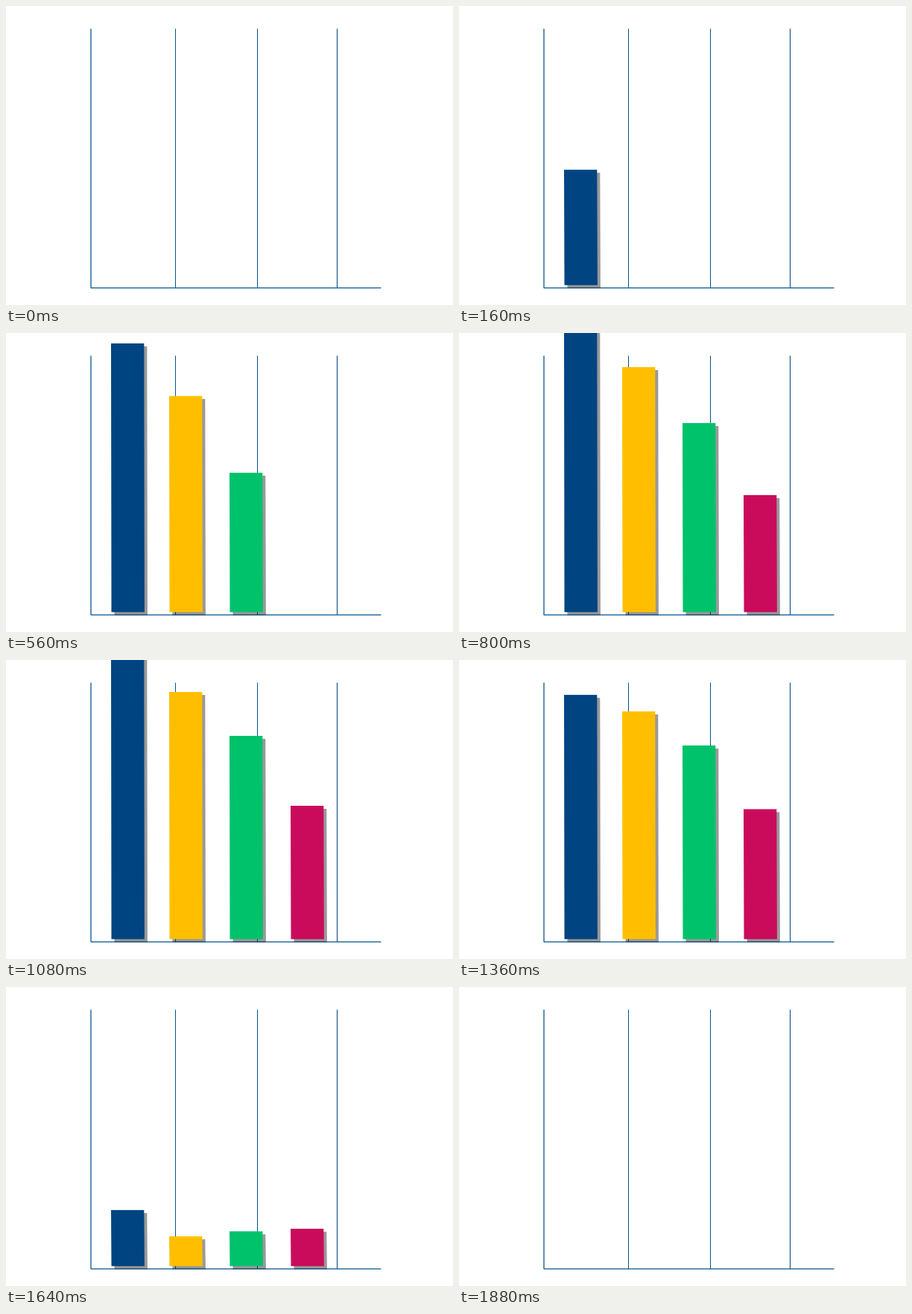
A matplotlib script that plays this animation: 600 by 402 pixels, repeating every 1.92 s.

```python
import numpy as np
import matplotlib.pyplot as plt
from matplotlib.animation import FuncAnimation
from matplotlib.patches import Polygon

W, H, DPI = 600, 402, 64
FRAMES, STEP = 48, 40
BASE, TOP, FLOOR = 375, 30.5, 379
NAVY, BLUE = "#004481", "#00528f"
SHRINK_END = 1860

S = np.linspace(0, 1, 1001)


def ease(t, start, end, x1, x2):
    """Cubic Bezier easing with handles (x1, 0) and (x2, 1)."""
    a, b, c = 3 * (1 - S) ** 2 * S, 3 * (1 - S) * S ** 2, S ** 3
    u = np.clip((t - start) / (end - start), 0, 1)
    return np.interp(u, a * x1 + b * x2 + c, b + c)


class Bar:
    def __init__(self, x, color, full, rise, fall, landing):
        self.x, self.full = x, full
        self.rise, self.fall, self.landing = rise, fall, landing
        self.shadow = self.patch("black", 2, alpha=0.4)
        self.front = self.patch(color, 3)

    def patch(self, color, z, **kw):
        return ax.add_patch(Polygon(self.corners(0), fc=color, ec="none", lw=0,
                                    zorder=z, snap=False, **kw))

    def corners(self, h):
        x, low = self.x, BASE + 0.3
        return np.array([(x, BASE - h), (x + 44.3, BASE - h),
                         (x + 44.9, low), (x + 0.5, low)])

    def update(self, t):
        h = self.full * (ease(t, *self.rise, 0.18, 0.12)
                         - ease(t, self.fall, SHRINK_END, 0.4, self.landing))
        self.front.set_xy(self.corners(h))
        self.shadow.set_xy(self.corners(h) + 4)
        for p in (self.front, self.shadow):
            p.set_visible(h > 0.05)


fig = plt.figure(figsize=(W / DPI, H / DPI), dpi=DPI, facecolor="white")
ax = fig.add_axes([0, 0, 1, 1])
ax.set_xlim(0, W)
ax.set_ylim(H, 0)
ax.axis("off")


def line(xs, ys, color, width):
    ax.plot(xs, ys, color=color, lw=width * 72 / DPI, zorder=1,
            solid_capstyle="butt", solid_joinstyle="miter", snap=False)


for x, color in ((227.5, BLUE), (337.5, BLUE), (444.5, NAVY)):
    line([x, x], [TOP, FLOOR], color, 1)
line([114, 114, 503.5], [TOP, FLOOR, FLOOR], BLUE, 1.25)

bars = [
    Bar(141, NAVY, 380, rise=(0, 810), fall=1200, landing=0.53),
    Bar(219, "#ffbf00", 332, rise=(160, 900), fall=1260, landing=0.27),
    Bar(300, "#00c26b", 273, rise=(280, 1090), fall=1280, landing=0.37),
    Bar(382, "#ca0b5c", 179, rise=(560, 1000), fall=1300, landing=0.53),
]


def draw(i):
    for bar in bars:
        bar.update(i * STEP)


anim = FuncAnimation(fig, draw, frames=FRAMES, interval=STEP,
                     repeat=True, repeat_delay=0, blit=False)
plt.show()
```
